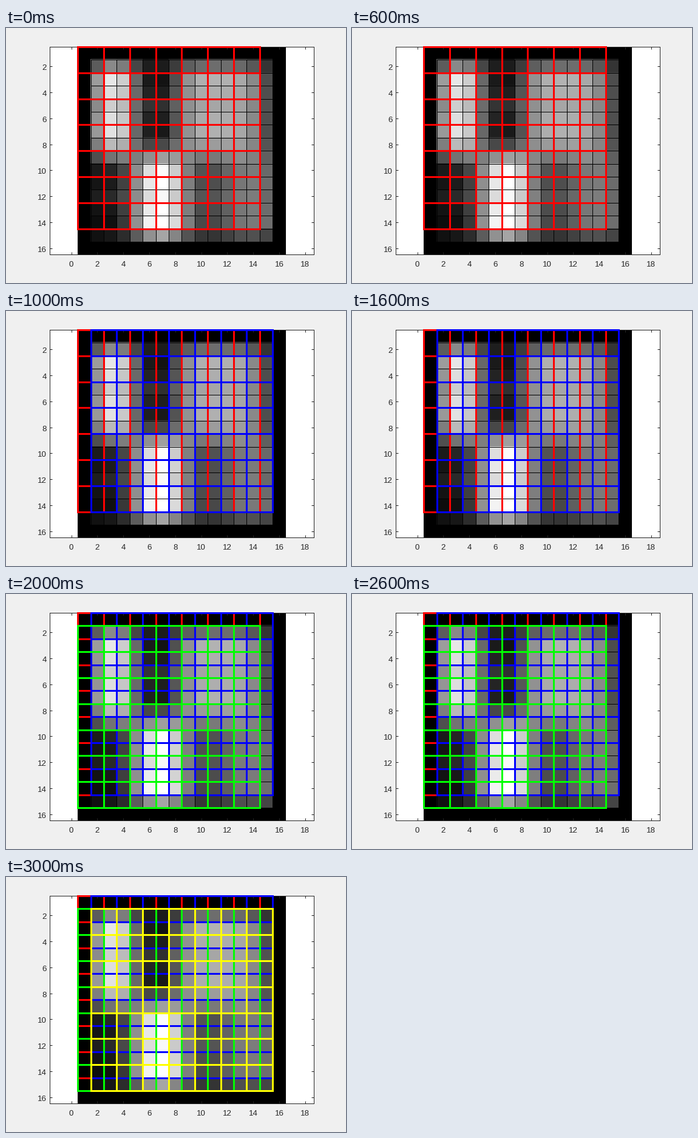
A matplotlib script for the animation above (4000 ms loop, 560 by 420 pixels).

```python
import numpy as np
import matplotlib.pyplot as plt
from matplotlib.animation import FuncAnimation
from matplotlib.transforms import ScaledTranslation

W, H, DPI = 560, 420, 96
CELL = 21.4          # pixels per matrix cell
INK = "#262626"
plt.rcParams["font.family"] = "Liberation Sans"

# Pooling grids: colour, x offset, y offset
GRIDS = [("#ff0000", 0, 0), ("#0000ff", 1, 0), ("#00ff00", 0, 1), ("#ffff00", 1, 1)]


def bump(x, center, width, power=2):
    return np.exp(-np.abs((x - center) / width) ** power)


def padded_map():
    """14 x 14 feature map with one cell of zero padding."""
    cells = np.arange(2, 16)
    upper = 20 + 195 * bump(cells, 3.3, 1.9) + 148 * bump(cells, 11.4, 3.7, 4)
    lower = 25 + 228 * bump(cells, 6.85, 2.25) + 100 * bump(cells, 13.6, 3.1)

    # Upper pattern gives way to the lower one; contrast ripples near the edges.
    rows = cells[:, None]
    ripple = 1.1 - 0.15 * np.cos(2 * np.pi * (rows - 5) / 3.5)
    weight = 0.5 - 0.5 * np.tanh(rows - 8.9) * ripple
    values = weight * upper + (1 - weight) * lower
    values[[0, -1]] *= 0.65
    return np.pad(values.clip(0, 255), 1)


def draw_lattice(x0, y0, size, step, **style):
    """Square lattice whose first corner is at (x0, y0)."""
    offsets = np.arange(0, size + step, step)
    lines = [ax.vlines(x0 + offsets, y0, y0 + size, **style),
             ax.hlines(y0 + offsets, x0, x0 + size, **style)]
    for group in lines:
        group.set(clip_on=False, capstyle="projecting", snap=True)
    return lines


fig = plt.figure(figsize=(W / DPI, H / DPI), dpi=DPI, facecolor="#f0f0f0")
left, bottom, width, height = 71.99, 46.51, 435, 16 * CELL
ax = fig.add_axes([left / W, bottom / H, width / W, height / H])
ax.imshow(padded_map(), cmap="gray", vmin=0, vmax=255, interpolation="nearest",
          extent=(0.5, 16.5, 16.5, 0.5), aspect="auto")

draw_lattice(1.5, 1.5, 14, 1, colors="black", linewidths=0.75, zorder=2)
grids = [draw_lattice(0.5 + dx, 0.5 + dy, 14, 2, colors=color, linewidths=2.25,
                      zorder=5 + i)
         for i, (color, dx, dy) in enumerate(GRIDS)]

half = width / CELL / 2
ax.set(xlim=(8.5 - half, 8.5 + half), ylim=(16.5, 0.5),
       xticks=range(0, 19, 2), yticks=range(2, 17, 2))
ax.tick_params(direction="in", top=True, right=True, length=3.2, width=0.75,
               color=INK, labelcolor=INK, labelsize=10)
ax.tick_params(axis="x", pad=8)
ax.tick_params(axis="y", pad=4)
for label in ax.get_yticklabels():
    lower_a_bit = ScaledTranslation(0, -1.5 / DPI, fig.dpi_scale_trans)
    label.set_transform(label.get_transform() + lower_a_bit)
for spine in ax.spines.values():
    spine.set(color=INK, linewidth=0.75)


def update(frame):
    for i, lines in enumerate(grids):
        for group in lines:
            group.set_visible(i <= frame)
    return []


anim = FuncAnimation(fig, update, frames=len(GRIDS), interval=1000,
                     init_func=lambda: update(0), repeat=True, repeat_delay=0)
plt.show()
```
